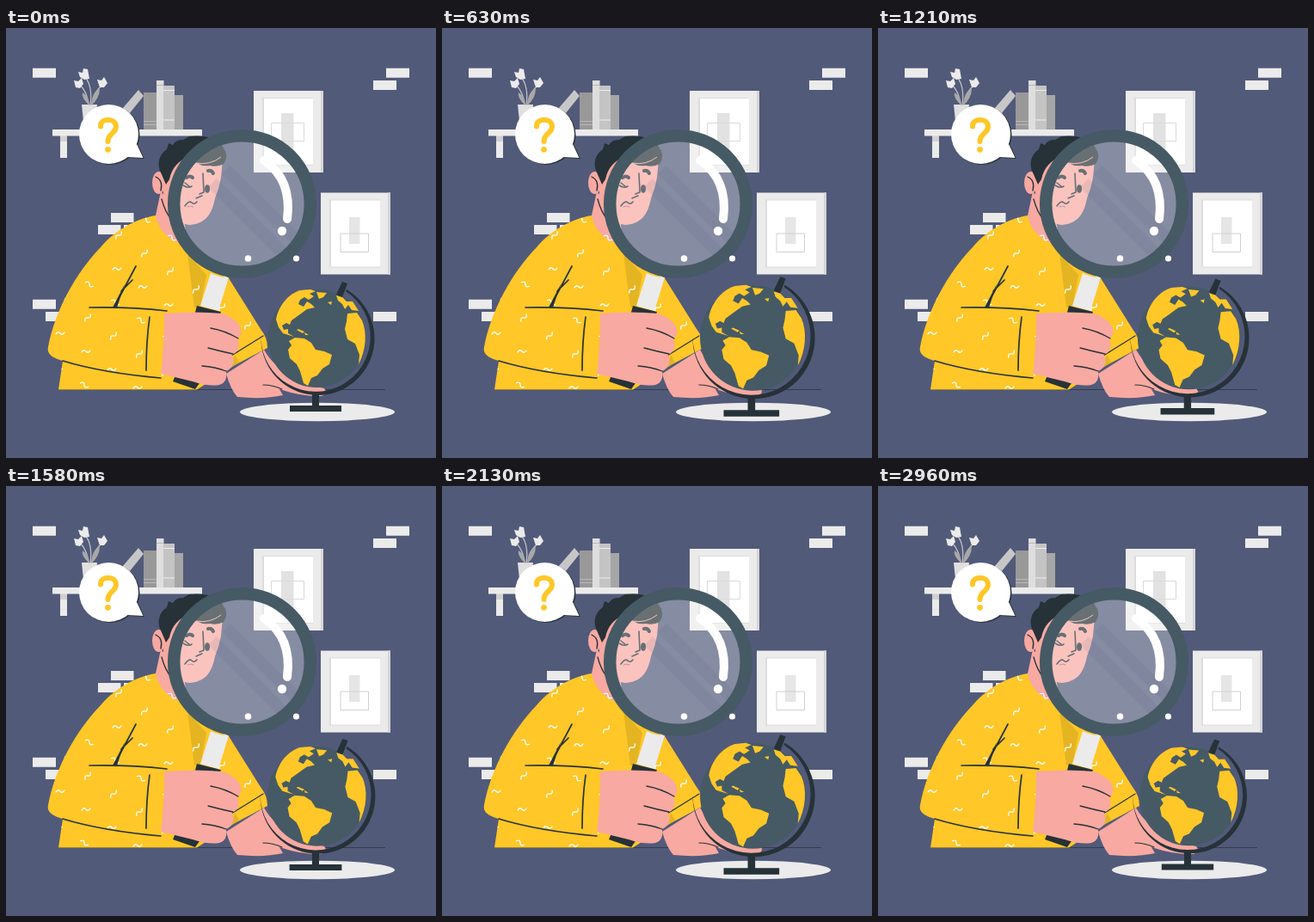
An HTML page for the animation above (3000 ms loop, 500 by 500 pixels).

```html
<!DOCTYPE html>
<html lang="en">
<head>
<meta charset="utf-8">
<title>Searching the globe</title>
<style>
html, body { margin: 0; width: 100%; height: 100%; overflow: hidden; background: #525a7a; }
svg { display: block; width: 100vw; height: 100vh; }
.line { fill: none; stroke: #263238; stroke-linecap: round; stroke-linejoin: round; }
.skin { fill: #f8a9a1; }
.dark { fill: #263238; }
.sun { fill: #ffc727; }
</style>
</head>
<body>
<svg viewBox="0 0 500 500">
  <defs>
    <clipPath id="glass"><circle cx="274.500" cy="204.500" r="73"/></clipPath>
    <path id="shirt" d="M174 218C150 222 126 236 110 255C82 284 57 328 49 371C47 380 56 384 66 387L61 420.500H222L266 392L304 372Q304 360 296 350L259 291L235 273L218 260L204 244Z"/>
    <clipPath id="cloth"><use href="#shirt"/></clipPath>
    <path id="squiggle" d="M-5 1Q-2.500-3 0 0T5-1" fill="none" stroke="#fff" stroke-width="1.400" stroke-linecap="round"/>
    <g id="bubble">
      <circle cx="119.500" cy="123.500" r="34.500"/>
      <path d="M141 150L152 135L159.500 151Z"/>
    </g>
    <g id="picture">
      <path fill="#ebebeb" d="M0 0H81V95H0Z"/>
      <path fill="#d6d6d6" d="M78 0H81V95H78Z"/>
      <path fill="#dcdcdc" d="M10 8H69V87H10Z"/>
      <path fill="#fff" d="M12 9H69V86H12Z"/>
    </g>
  </defs>

  <!-- bricks -->
  <path stroke="#ebebeb" stroke-width="11" d="M31 52.300H58M442 52.300H469M427 66.500H454M122 220.500H148.500M107 234.500H133.500M137 234.500H164M31 321.300H58M46 335.500H73M427 335.500H454"/>

  <!-- shelf, books and plant -->
  <path fill="#ebebeb" d="M54 118H228V125.500H54ZM63 125H71V151H63Z"/>
  <path fill="#d0d0d0" d="M63 125.500H71V132H63Z"/>
  <path fill="#c7c7c7" d="M154 72L160 79L135 110L123 108Z"/>
  <path fill="#999" d="M160 75H175V118H160Z"/>
  <path fill="#dedede" d="M175 61H183.500V118H175Z"/>
  <path fill="#c4c4c4" d="M183 67H196V118H183Z"/>
  <path fill="#a6a6a6" d="M196 78H206V118H196Z"/>
  <path stroke="#b8b8b8" d="M160 108.500H175M160 112.500H175M175 66.500H183"/>
  <path stroke="#ededed" d="M183 72.500H196M183 107H196"/>
  <path fill="#e0e0e0" d="M88 89H106L103 118H91Z"/>
  <path fill="none" stroke="#c4c4c4" stroke-width="1.200" d="M96 90Q95 76 87 67M98 90Q101 68 92 57M100 90Q101 76 111 67"/>
  <path fill="#a8a8a8" d="M97 90Q87 81 89 75Q97 80 97 90ZM99 90Q100 74 109 70Q109 82 99 90Z"/>
  <path fill="#ebebeb" d="M84 51L89 52L90 47L95 48L97 59L91 60L86 57ZM79 61L84 62L88 58L90 65L86 70L81 69ZM106 60L111 61L114 57L118 64L114 69L109 69Z"/>

  <!-- pictures -->
  <use href="#picture" x="288" y="73"/>
  <path fill="#e2e2e2" d="M320 99H334.500V146H320Z"/>
  <path fill="none" stroke="#dadada" d="M308.500 110.500H346.500V131.500H308.500Z"/>
  <use href="#picture" x="366" y="191.500"/>
  <path fill="#e6e6e6" d="M399 220H411.500V251H399Z"/>
  <path fill="none" stroke="#d0d0d0" d="M389 239H421.500V260.500H389Z"/>

  <!-- speech bubble -->
  <use href="#bubble" class="dark" x="1.500" y="1"/>
  <use href="#bubble" fill="#fff"/>
  <path fill="none" stroke="#ffc727" stroke-width="6" stroke-linecap="round" d="M110 114.500C109 104 128 104 128 114.500C128 123 118.500 122 118.500 132"/>
  <circle class="sun" cx="118.500" cy="141.300" r="3.400"/>

  <ellipse cx="362" cy="446.500" rx="90" ry="10.700" fill="#ebebeb"/>
  <path stroke="#263238" stroke-width=".7" d="M61 420.500H441"/>

  <!-- body -->
  <use href="#shirt" class="sun"/>
  <path fill="#e4b423" d="M211 262L233 287L226 325H219ZM266 380L271 389L262 394Z"/>
  <path class="skin" d="M180 190L174 218C177 236 193 251 211 252L207 222Z"/>
  <path class="skin" d="M256 402L300 374C310 392 330 410 370 419Q375 424 367 428Q345 429 318 420L322 427Q300 432 269 429Q261 420 256 402Z"/>
  <path class="line" stroke-width="1.200" d="M299 415Q310 415 321 420M262 381L299 358"/>
  <g id="pattern" clip-path="url(#cloth)"></g>
  <path class="line" stroke-width="1.700" d="M97 325Q145 324 187 329M126 324L151 277M134 306L147 293M167 336Q163 365 163 398M66 387Q112 401 180 407"/>
  <path class="dark" d="M124 325L138 298L129 325Z"/>

  <!-- head -->
  <path class="skin" d="M183 155V198Q193 227 213 229C229 228 239 220 243 198Q253 175 251 148L215 138Z"/>
  <ellipse class="skin" cx="177.500" cy="180" rx="7.500" ry="13"/>
  <path class="line" stroke-width="1.300" d="M174 173Q183 177 180 189M181 199Q185 214 192 222"/>
  <path class="dark" d="M186 182L180 168C175 158 178 147 187 141L189 134L194 136Q198 129 206 130L213 126Q241 123 252 138Q260 148 253 158Q246 162 237 160Q222 162 214 149Q194 156 190 176Z"/>
  <path fill="none" stroke="#f8a9a1" d="M221 157Q237 160 250 150"/>
  <path class="line" stroke-width="4" d="M210 174Q214 171 217 174M235 166Q239 165 241 169"/>
  <ellipse class="dark" cx="234" cy="187" rx="3" ry="4.700"/>
  <path class="line" stroke-width="1.600" d="M206 183Q212 187 216 184M208 180L213 184M229 169L230 191L225 193M221 198L228 195M208 207Q213 200 216 203T222 202"/>
  <path class="line" stroke-width="1" style="stroke:#b05c72" d="M211 208Q215 206 218 208"/>

  <!-- magnifier -->
  <g clip-path="url(#glass)">
    <path fill="#fff" opacity=".3" d="M200 130H350V280H200Z"/>
    <path stroke="#525a7a" opacity=".1" stroke-width="14" d="M240 180L340 280M256 165L350 259"/>
  </g>
  <circle cx="274.500" cy="204.500" r="79.300" fill="none" stroke="#455a64" stroke-width="14.500"/>
  <path fill="none" stroke="#fff" stroke-width="10" stroke-linecap="round" d="M300 154Q333 176 327 222"/>
  <g fill="#fff">
    <circle cx="321" cy="236" r="5.200"/>
    <circle cx="281.500" cy="268" r="3.800"/>
    <circle cx="337.500" cy="268" r="3.600"/>
  </g>
  <path fill="#ebebeb" d="M238 285Q248 290 259 290L247 329L226 323Z"/>
  <path class="dark" d="M222 323L250 330L247 338L219 334ZM197 404L225 413L220 420L194 411Z"/>
  <path class="skin" d="M184 332Q220 329 252 332Q276 342 273 356Q272 360 269 361Q274 374 263 380Q268 393 256 399Q258 412 248 415Q235 417 217 411L180 402Q184 370 184 332Z"/>
  <path class="line" stroke-width="1.300" d="M238 349Q255 352 270 361M235 372Q250 376 264 379M228 393Q243 394 256 399"/>

  <!-- globe -->
  <g id="globe">
    <path class="dark" d="M356 425H364V439H390V446H330V439H356Z"/>
    <circle cx="361.500" cy="361" r="57" fill="#455a64"/>
    <g class="sun">
      <path d="M314 339C317 322 329 309 342 305L354 304L360 306L353 309L358 312L352 316L347 313L342 316L340 321L346 324L350 318L355 321L359 325L350 327L339 335L332 340L330 345L326 343L321 346L323 351L328 350L328 355L335 359L322 355L317 348Z"/>
      <path d="M361 307L373 308L369 313L364 315ZM340 350L347 353L345 355L338 351ZM347 354L352 357L348 357Z"/>
      <path d="M329 364L336 360L347 361L355 366L360 374L370 376L379 380L376 391L368 396L362 404L355 407L351 416L346 413L342 399L338 391L330 384L328 374L332 369Z"/>
      <path d="M397 332L408 331L414 340C420 354 419 374 410 391L411 380L406 367L397 362L394 350L396 341Z"/>
      <path d="M384 311L391 313L396 318L403 318L410 329L402 328L398 322L394 327L391 321L386 317ZM374 319L379 318L378 322Z"/>
    </g>
    <path class="dark" d="M396 304A66 66 0 1 1 296.500 360A63.600 63.600 0 1 0 395 306Z"/>
    <path class="dark" d="M384 310L391 295L397 297L391 313Z"/>
  </g>
</svg>
<script>
const byId = id => document.getElementById(id);

// Shirt print: a slanted lattice, clipped to the cloth, with three directions in turn
let marks = '';
for (let i = -4; i <= 2; i++) {
  for (let j = -1; j <= 4; j++) {
    const x = 129 + 32 * i + 30 * j, y = 280 - 18 * i + 21 * j;
    const angle = 40 * ((i + 7) % 3 - 1) || 0;
    marks += `<use href="#squiggle" transform="translate(${x} ${y}) rotate(${-angle})"/>`;
  }
}
byId('pattern').innerHTML = marks;

// The globe swells and shrinks twice per loop about its own centre
const globe = byId('globe');
function draw() {
  const scale = 1 + .08 * Math.abs(Math.sin(Math.PI * performance.now() / 1500));
  globe.setAttribute('transform', `translate(362 370.5) scale(${scale}) translate(-362 -370.5)`);
  requestAnimationFrame(draw);
}
draw();
</script>
</body>
</html>
```
